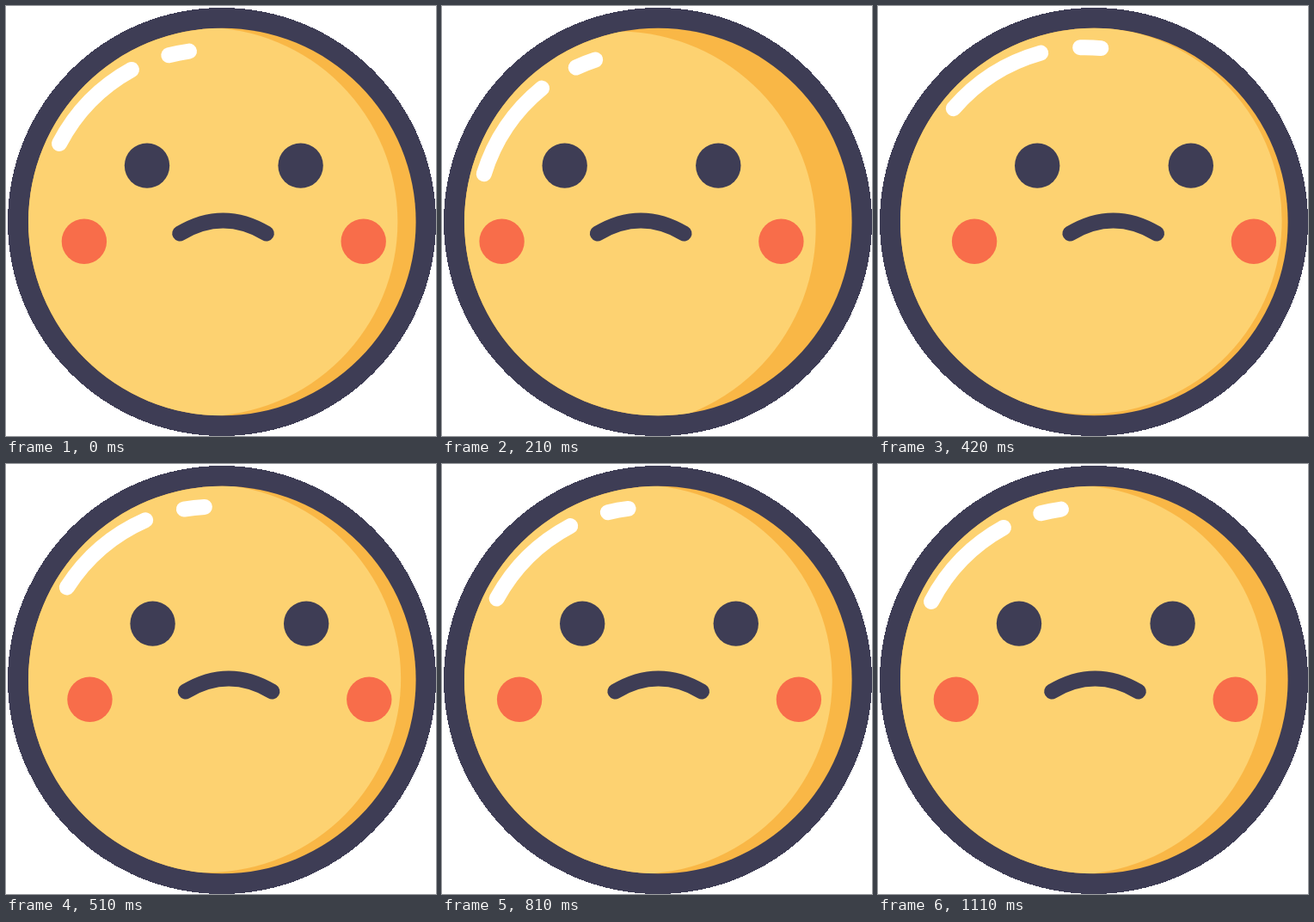
An HTML page without scripts that plays this animation: 500x500 px, repeating every 1.53 s.

```html
<!DOCTYPE html>
<html lang="en">
<head>
<meta charset="utf-8">
<title>Head shake</title>
<style>
  @property --t {
    syntax: "<number>";
    inherits: true;
    initial-value: 0;
  }

  html, body { margin: 0; width: 100%; height: 100%; overflow: hidden; background: #fff; }

  svg {
    --ink: #3e3d55;
    /* progress of each swing: left, right, left, right, back to rest */
    --u1: clamp(0, var(--t) / 165, 1);
    --u2: clamp(0, (var(--t) - 165) / 255, 1);
    --u3: clamp(0, (var(--t) - 420) / 255, 1);
    --u4: clamp(0, (var(--t) - 675) / 255, 1);
    --u5: clamp(0, (var(--t) - 930) / 180, 1);
    /* soft ease in and out */
    --e1: (var(--u1) * (.3 + var(--u1) * (2.1 - 1.4 * var(--u1))));
    --e2: (var(--u2) * (.3 + var(--u2) * (2.1 - 1.4 * var(--u2))));
    --e3: (var(--u3) * (.3 + var(--u3) * (2.1 - 1.4 * var(--u3))));
    --e4: (var(--u4) * (.3 + var(--u4) * (2.1 - 1.4 * var(--u4))));
    --e5: (var(--u5) * (.3 + var(--u5) * (2.1 - 1.4 * var(--u5))));
    --turn: (26.4 * (var(--e2) - var(--e3) + var(--e4)) - 13.2 * (var(--e1) + var(--e5)));
    --slide: (47.8 * (var(--e2) - var(--e3) + var(--e4)) - 26.6 * var(--e1) - 21.2 * var(--e5));
    --shade: (22 + 30.5 * var(--e1) - 45.5 * var(--e2) + 35.7 * var(--e3) - 35 * var(--e4) + 18.9 * var(--e5));
    display: block;
    width: 100%;
    height: 100%;
    animation: clock 1530ms steps(51) infinite;
  }

  @keyframes clock {
    from { --t: 0; }
    to { --t: 1530; }
  }

  .turn {
    transform-origin: 251.3px 251px;
    transform: rotate(calc(var(--turn) * 1deg));
  }

  /* the lit disc always meets the rim at both ends of its diameter */
  .lit {
    cx: calc((251.3 - var(--shade)) * 1px);
    r: calc((225 + var(--shade) * var(--shade) / 450) * 1px);
    fill: #fdd271;
  }

  .features { transform: translateX(calc(var(--slide) * 1px)); }

  .ink { fill: var(--ink); }
  .cheek { fill: #f86d4a; }
  .line { fill: none; stroke-width: 18; stroke-linecap: round; }
</style>
</head>
<body>
<svg viewBox="0 0 500 500">
  <clipPath id="rim"><circle cx="251.3" cy="251" r="225.3"/></clipPath>

  <circle class="ink" cx="251" cy="251" r="249" shape-rendering="crispEdges"/>
  <circle cx="251.3" cy="251" r="225.3" fill="#f9b746"/>
  <g clip-path="url(#rim)">
    <g class="turn"><circle class="lit" cy="251"/></g>
  </g>

  <g class="turn line" stroke="#fff">
    <path d="M62 160A208 208 0 0 1 146 74"/>
    <path d="M189.3 57.3A203 203 0 0 1 213 52.6"/>
  </g>

  <g class="features">
    <circle class="ink" cx="164" cy="185.6" r="26.2"/>
    <circle class="ink" cx="342.6" cy="185.6" r="26.2"/>
    <circle class="cheek" cx="90.9" cy="273.8" r="26.2"/>
    <circle class="cheek" cx="415.7" cy="273.8" r="26.2"/>
    <path class="line" stroke="var(--ink)" d="M202.2 264.5Q252.4 234.5 302.8 264.5"/>
  </g>
</svg>
</body>
</html>
```
